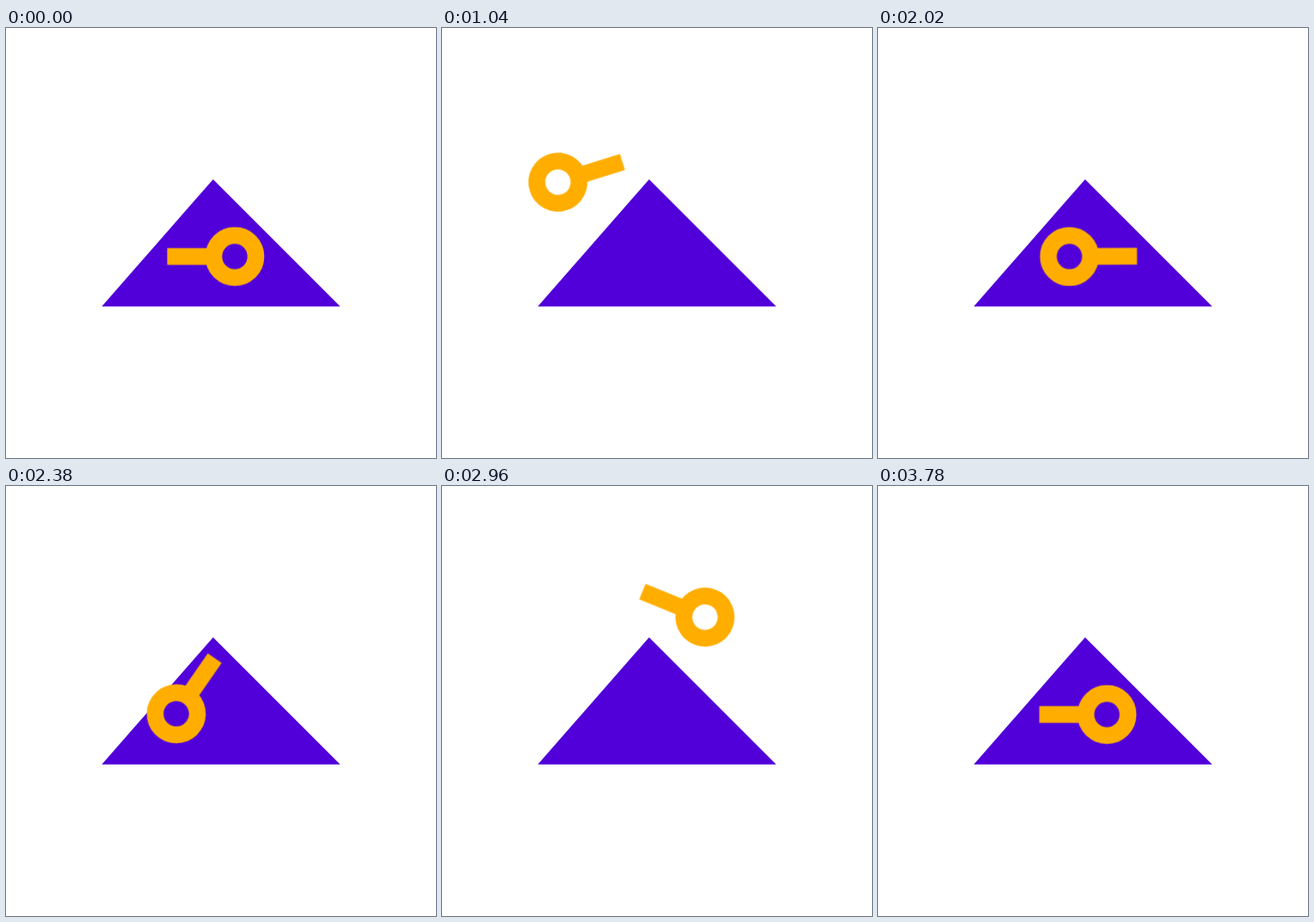
An HTML page that plays this animation: 500 px wide and 500 px high, repeating every 4.02 s.

```html
<!DOCTYPE html>
<html lang="en">
<head>
<meta charset="utf-8">
<title>Loop over a triangle</title>
<style>
  html, body {
    margin: 0;
    width: 100%;
    height: 100%;
    overflow: hidden;
    background: #fff;
  }
  svg {
    position: absolute;
    left: 0;
    top: 0;
    overflow: visible;
  }
  .key {
    position: absolute;
    left: 0;
    top: 0;
    width: 0;
    height: 0;
    offset-path: path("M266 265.7 C328 265.7 368.5 246 368.5 204 C368.5 171.4 313.6 145 246 145 C178.4 145 123.5 171.4 123.5 204 C123.5 249 154 265.7 222.8 265.7");
    offset-rotate: 0deg;
    animation: travel 4020ms -15ms infinite, turn 4020ms -15ms infinite;
  }
  /* Out over the top, short rest, back the same way, rest. */
  @keyframes travel {
    0% { offset-distance: 0%; animation-timing-function: cubic-bezier(.7, 0, .3, 1); }
    45.9%, 49.63% { offset-distance: 100%; animation-timing-function: cubic-bezier(.7, 0, .3, 1); }
    95.4%, 100% { offset-distance: 0%; }
  }
  @keyframes turn {
    0% { transform: rotate(180deg); animation-timing-function: cubic-bezier(.5, 0, 0, 1); }
    45.9%, 49.63% { transform: rotate(360deg); animation-timing-function: cubic-bezier(.355, 0, .044, 1); }
    95.4%, 100% { transform: rotate(180deg); }
  }
</style>
</head>
<body>
  <svg width="500" height="500" viewBox="0 0 500 500">
    <path d="M240.8 176 L388.6 323.8 H111.4 Z" fill="#5100d9"/>
  </svg>
  <div class="key">
    <svg width="1" height="1" fill="none" stroke="#ffae00" stroke-width="19.6">
      <circle r="24.5"/>
      <path d="M30 0 H78.6"/>
    </svg>
  </div>
</body>
</html>
```
